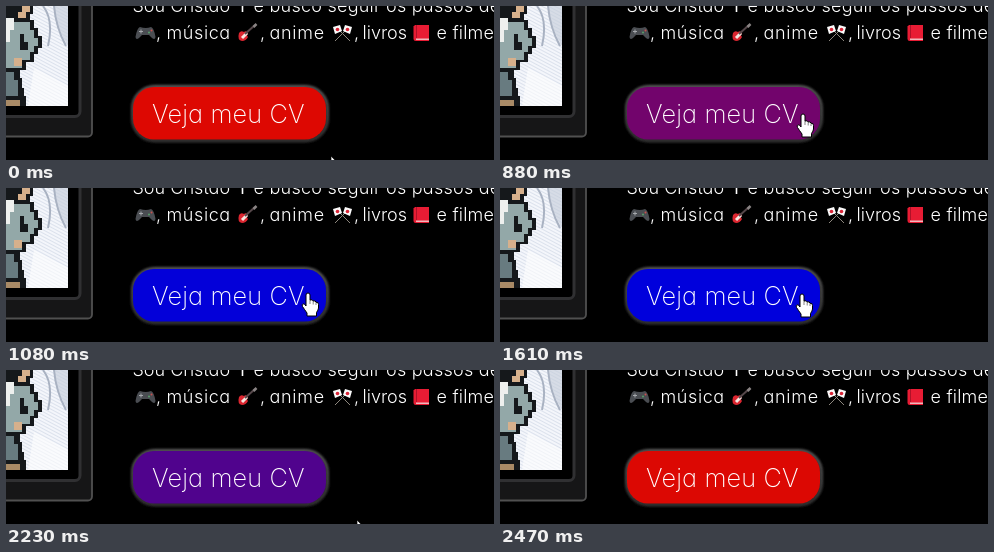
Recreate the animation shown at these times as an HTML page. Size 488 by 154 pixels, loop 2540 ms.

```html
<!DOCTYPE html>
<html lang="pt">
<head>
<meta charset="utf-8">
<title>Veja meu CV</title>
<style>
  html, body { margin: 0; width: 100%; height: 100%; overflow: hidden; background: #000; }
  svg { display: block; width: 100%; height: 100%; }
  text { font-family: Inter, "Open Sans", sans-serif; font-weight: 300; font-feature-settings: "cv11"; fill: #fff; }
  .copy { font-size: 18px; }
  .label { font-size: 25.3px; font-weight: 250; }
</style>
</head>
<body>
<svg viewBox="0 0 488 154">
  <defs>
    <filter id="soft" x="-10%" y="-30%" width="120%" height="160%"><feGaussianBlur stdDeviation="1"/></filter>
    <pattern id="weave" width="6" height="6" patternUnits="userSpaceOnUse" patternTransform="rotate(28)">
      <rect width="6" height="6" fill="#f4f6fb"/>
      <path d="M0 1.500H6M0 4.500H6" stroke="#dbe1ec"/>
    </pattern>
    <linearGradient id="bevel" x1="0" y1="0" x2="0" y2="1">
      <stop offset="0" stop-color="#626262"/><stop offset="1" stop-color="#303030"/>
    </linearGradient>
    <clipPath id="photo"><rect width="62" height="100"/></clipPath>
  </defs>
  <rect width="488" height="154"/>

  <!-- picture in its frame -->
  <rect x="-20" y="-20" width="106" height="150.500" rx="4" fill="#161617" stroke="#505050" stroke-width="1.800"/>
  <rect x="-20" y="-20" width="94" height="130.500" rx="5" fill="#000" stroke="#303032" stroke-width="3"/>
  <g clip-path="url(#photo)">
    <rect width="62" height="100" fill="url(#weave)"/>
    <path d="M48 0H62V40Q52 26 48 0Z" fill="#c3cbd9" opacity=".6"/>
    <path d="M37 0Q48 14 42 40M48 0Q50 22 60 40" fill="none" stroke="#a9b2c2" stroke-width="2"/>
    <path d="M28 62L62 80V100H22Z" fill="#fff" opacity=".6"/>
    <g shape-rendering="crispEdges">
      <path d="M0 0H27V8H24V14H28V22H32V30H36V42H32V48H28V56H20V64H14V72H16V82H18V90H20V100H0Z" fill="#15181b"/>
      <path d="M0 16H24V24H28V32H32V40H28V46H24V54H16V62H0Z" fill="#93a8a8"/>
      <path d="M14 28H18V36H22V44H14Z" fill="#15181b"/>
      <path d="M16 0H24V6H20V12H12V6H16Z" fill="#d6b08c"/>
      <path d="M0 12H8V24H4V36H0Z" fill="#eef0ee"/>
      <path d="M8 52H16V60H8Z" fill="#d6b08c"/>
      <path d="M0 66H8V74H12V90H0Z" fill="#687b80"/>
      <path d="M0 94H14V100H0Z" fill="#a98a66"/>
    </g>
  </g>

  <!-- paragraph -->
  <g class="copy">
    <text x="126.500" y="5.500">Sou Cristão</text>
    <path d="M236.500 -8V6M232 -3H241" stroke="#fff" stroke-width="1.600"/>
    <text x="247.500" y="5.500" letter-spacing=".24">e busco seguir os passos de</text>
    <text x="150" y="32.500">,</text>
    <text x="160.500" y="32.500" letter-spacing=".6">música</text>
    <text x="254" y="32.500">,</text>
    <text x="263.500" y="32.500" letter-spacing=".7">anime</text>
    <text x="348" y="32.500">,</text>
    <text x="356.500" y="32.500">livros</text>
    <text x="430.500" y="32.500" letter-spacing=".2">e filmes</text>
  </g>

  <!-- gamepad -->
  <path d="M134 21Q140 23 145 21Q148 22 149.500 31Q149 34.500 146 32L143 29H136L133 32Q130 34.500 129.500 31Q131 22 134 21Z" fill="#4a4d52"/>
  <path d="M133 25.500H137M135 23.500V27.500" stroke="#a5a8ac"/>
  <circle cx="143" cy="26.500" r="1" fill="#58a06a"/><circle cx="145.500" cy="24.500" r="1" fill="#c8504e"/>
  <!-- guitar -->
  <path d="M233 27Q235 24 238 26Q240 24 242 27Q240 29 242 31Q240 35 236 35Q231 34 233 27Z" fill="#dc2630"/>
  <path d="M236 32L241 27" stroke="#f6e6e0" stroke-width="3"/>
  <path d="M239 28L249 19" stroke="#55474a" stroke-width="2"/>
  <path d="M247.500 21L250.500 18" stroke="#8a8484" stroke-width="2.500"/>
  <!-- crossed flags -->
  <path d="M330 21L344 35M343 21L329 35" stroke="#8d877e"/>
  <path d="M327 21L334 19L336 25L329 28ZM346 21L339 19L337 25L344 28Z" fill="#fafafa"/>
  <circle cx="331.500" cy="23.500" r="1.800" fill="#d92537"/><circle cx="341.500" cy="23.500" r="1.800" fill="#d92537"/>
  <!-- book -->
  <path d="M409 19H423V35H410Q407.500 35 407.500 32.500V20.500Z" fill="#e81c34"/>
  <path d="M410 33.200H423" stroke="#f1dfdf" stroke-width="1.200"/>
  <path d="M410.500 19V32" stroke="#b01228"/>

  <!-- button -->
  <rect x="126" y="80" width="196" height="55.500" rx="23" fill="#2c2c2c" stroke="url(#bevel)" stroke-width="2" filter="url(#soft)"/>
  <rect id="button" x="127" y="81" width="193" height="52.500" rx="21"/>
  <text class="label" x="146" y="116.500" letter-spacing=".15">Veja meu CV</text>

  <g fill="#fff" stroke="#000" stroke-linejoin="round">
    <path id="arrow" d="M0 0V16.500L3.800 13L6.400 19L9 17.900L6.400 12H11.500Z" stroke-width=".7"/>
    <g id="hand">
      <path d="M-2 2Q-2 0 0 0Q2 0 2 2V7Q4.500 6 5.200 8Q7.500 7.200 8 9.200Q10.500 8.800 10.500 11.500V15Q10.300 17 8.500 19.500V23H-1V20Q-3.500 16.500-5.500 13.500Q-6.500 11.500-5 10.800Q-3.500 10.500-2 13Z"/>
      <path d="M2 7V11M5.200 8V11.500M8 9.200V12" stroke-width=".5"/>
    </g>
  </g>
</svg>
<script>
  const LOOP = 2540, FADE = 350, ENTER = 780, LEAVE = 2150;
  const RED = [221, 8, 2], BLUE = [0, 0, 220];

  // The screen refreshes only at these moments.
  const ticks = [0, 70, 140, 270, 470, 540, 610, 740, 810, 880, 940, 1010, 1080,
    1610, 1680, 1740, 1810, 1880, 1950, 2020, 2090, 2150, 2230, 2300, 2400, 2470];

  // Pointer path: time, x, y
  const path = [[0, 325, 150], [270, 318, 140], [470, 317, 138], [610, 314, 131],
    [740, 308, 120], [880, 303, 108], [1010, 302, 105], [1610, 302, 106],
    [2020, 309, 114], [2090, 312, 118], [2150, 327, 138], [2230, 351, 150], [2300, 372, 160]];

  const [button, arrow, hand] = ['button', 'arrow', 'hand'].map(id => document.getElementById(id));
  const clamp = v => Math.min(1, Math.max(0, v));
  const mix = (a, b, k) => a + (b - a) * k;
  const bezier = (a, b, s) => 3 * a * s * (1 - s) ** 2 + 3 * b * s * s * (1 - s) + s ** 3;

  // CSS "ease" curve
  function ease(x) {
    let lo = 0, hi = 1;
    for (let i = 0; i < 20; i++) {
      const mid = (lo + hi) / 2;
      if (bezier(.25, .25, mid) < x) lo = mid; else hi = mid;
    }
    return bezier(.1, 1, lo);
  }

  function pointer(t) {
    const i = path.findIndex(p => p[0] > t);
    if (i < 0) return path[path.length - 1].slice(1);
    const a = path[i - 1], b = path[i], k = (t - a[0]) / (b[0] - a[0]);
    return [Math.round(mix(a[1], b[1], k)), Math.round(mix(a[2], b[2], k))];
  }

  function draw(time) {
    const t = ticks.filter(v => v <= time).pop();
    const blue = ease(clamp((t - ENTER) / FADE)) - ease(clamp((t - LEAVE) / FADE));
    button.setAttribute('fill', `rgb(${RED.map((c, i) => Math.round(mix(c, BLUE[i], blue)))})`);

    const over = t >= 740 && t < LEAVE;
    const place = `translate(${pointer(t)})`;
    arrow.setAttribute('transform', place);
    hand.setAttribute('transform', place);
    arrow.setAttribute('visibility', over ? 'hidden' : 'visible');
    hand.setAttribute('visibility', over ? 'visible' : 'hidden');
  }

  const start = performance.now();
  function frame() {
    draw((performance.now() - start) % LOOP);
    requestAnimationFrame(frame);
  }
  frame();
</script>
</body>
</html>
```
